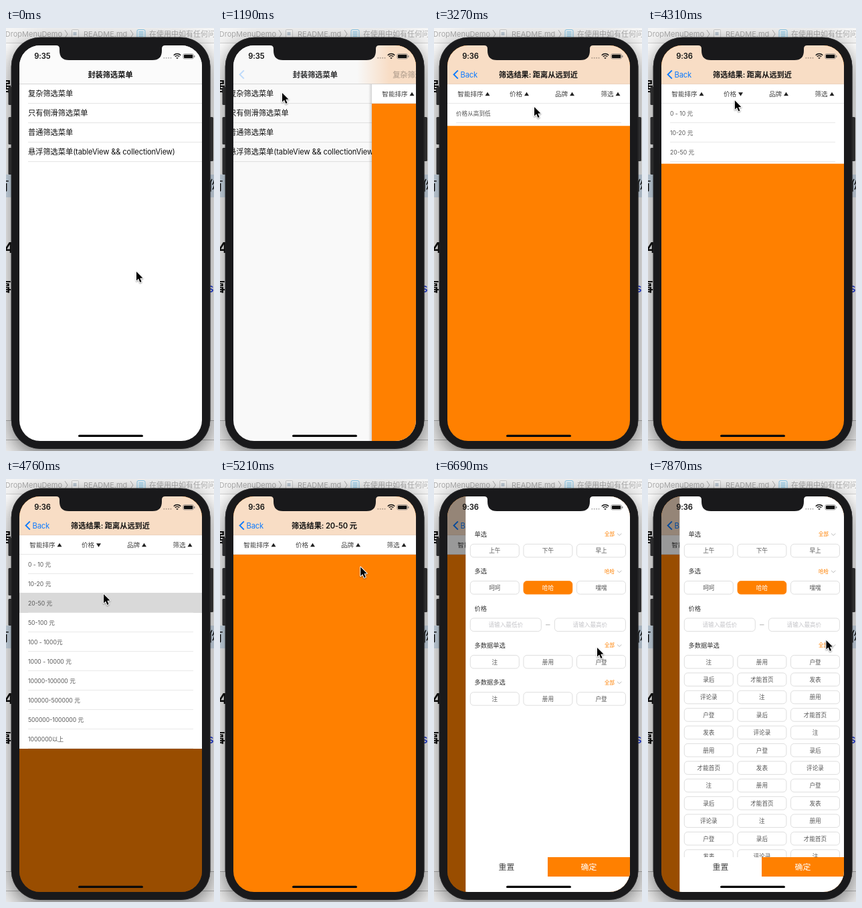
These frames come from a looping animation (311x632 px, 8000 ms). An HTML page with a canvas:

```html
<!DOCTYPE html>
<html lang="zh">
<head>
<meta charset="utf-8">
<title>Filter menu demo</title>
<style>
html, body { margin: 0; width: 100%; height: 100%; overflow: hidden; background: #fff; }
canvas { display: block; width: 311px; height: 632px; }
</style>
</head>
<body>
<canvas id="stage"></canvas>
<script>
const W = 311, H = 632, LOOP = 8000, TICK = 148.45;
const ORANGE = '#ff8000', TAN = '#f8ddc5', BLUE = '#0a7aff', GREY = '#555', EDGE = '#d0d0d0';
const FONT = 'Inter, "Noto Sans CJK SC", "Noto Sans CJK", sans-serif';
const SX = 20, SY = 26, SW = 273, SH = 591;   // phone screen
const ROW = 29, BAR = 84, LIST = 113;

const canvas = document.getElementById('stage');
const dpr = window.devicePixelRatio || 1;
canvas.width = W * dpr;
canvas.height = H * dpr;
const c = canvas.getContext('2d');

const HOME_ROWS = ['复杂筛选菜单', '只有侧滑筛选菜单', '普通筛选菜单', '悬浮筛选菜单(tableView && collectionView)'];
const TABS = [['智能排序', 35.3], ['价格', 113], ['品牌', 181], ['筛选', 249.5]];
const WORDS = ['注', '册用', '户登', '录后', '才能首页', '发表', '评论录'];
const MENUS = [
  { tab: 0, open: 2290, press: 2820, close: 3059, pick: 2,
    rows: ['价格从高到低', '价格从低到高', '距离从远到近', '销量从低到高', '信用从高到低'] },
  { tab: 1, open: 4194, press: 4740, close: 4860, pick: 2,
    rows: ['0 - 10 元', '10-20 元', '20-50 元', '50-100 元', '100 - 1000元', '1000 - 10000 元',
      '10000-100000 元', '100000-500000 元', '500000-1000000 元', '1000000以上'] }
];
// time, x, y of the pointer tip
const POINTER = [
  [150, 195, 364], [890, 93, 97], [1640, 93, 97], [1900, 72, 97], [2220, 72, 97],
  [2520, 94, 177], [2900, 94, 177], [3265, 150, 118], [3700, 130, 97], [4160, 127, 97],
  [4750, 146, 172], [4880, 146, 172], [5480, 265, 97], [5620, 264, 98], [5938, 252, 127],
  [6330, 172, 158], [6400, 172, 158], [6680, 244, 252], [7250, 266.5, 241]
];

const clamp = v => Math.max(0, Math.min(1, v));
const ease = v => { v = clamp(v); return v * v * (3 - 2 * v); };
const mix = (a, b, k) => a + (b - a) * k;

function rect(x, y, w, h, fill) {
  c.fillStyle = fill;
  c.fillRect(x, y, w, h);
}

function round(x, y, w, h, r, fill, stroke) {
  c.beginPath();
  c.roundRect(x, y, w, h, r);
  if (fill) { c.fillStyle = fill; c.fill(); }
  if (stroke) { c.strokeStyle = stroke; c.lineWidth = 0.7; c.stroke(); }
}

function poly(points, fill) {
  c.beginPath();
  points.forEach(([x, y]) => c.lineTo(x, y));
  c.closePath();
  c.fillStyle = fill;
  c.fill();
}

function line(points, color, width) {
  c.beginPath();
  points.forEach(([x, y]) => c.lineTo(x, y));
  c.strokeStyle = color;
  c.lineWidth = width;
  c.stroke();
}

// y is the visual middle; Latin runs of large text are tracked tighter
function text(s, x, y, size, color, align = 'left', weight = 400) {
  c.font = `${weight} ${size}px ${FONT}`;
  c.fillStyle = color;
  c.textAlign = 'left';
  const runs = s.match(/[\x00-\x7f]+|[^\x00-\x7f]+/g).map(run => {
    const gap = size > 11.1 && run.charCodeAt(0) < 128 ? -0.0125 * size : 0;
    c.letterSpacing = gap + 'px';
    return { run, gap, width: c.measureText(run).width };
  });
  const total = runs.reduce((sum, r) => sum + r.width, 0);
  x -= align === 'center' ? total / 2 : align === 'right' ? total : 0;
  for (const r of runs) {
    c.letterSpacing = r.gap + 'px';
    c.fillText(r.run, x, y + 0.37 * size);
    x += r.width;
  }
  c.letterSpacing = '0px';
}

function faded(alpha, draw) {
  c.save();
  c.globalAlpha *= clamp(alpha);
  draw();
  c.restore();
}

function clipped(x, y, w, h, draw) {
  c.save();
  c.beginPath();
  c.rect(x, y, w, h);
  c.clip();
  draw();
  c.restore();
}

function desktop() {
  rect(0, 0, W, H, '#f6f6f6');
  rect(0, 23, W, H, '#fff');
  rect(0, 22, W, 0.8, '#cfcfcf');
  const ink = '#adadad';
  text('DropMenuDemo', 84, 9, 11, ink, 'right');
  text('README.md', 116, 9, 11, ink);
  text('在使用中如有任何问题', 214, 9, 11, ink);
  for (const x of [88, 186]) line([[x, 3], [x + 4, 9], [x, 15]], ink, 1);
  round(98.5, 2.5, 10, 13, 1, '#fafafa', '#bbb');
  rect(100.5, 6, 5, 5, '#c3cfda');
  round(196, 2.5, 12, 13, 2, '#eef8fd', '#62b9e6');
  for (let i = 0; i < 3; i++) rect(198.5, 5.5 + i * 3, 7, 1, '#62b9e6');
  rect(0, 219, W, 34, '#d9e8f6');
  text('居', -12, 88, 20, '#111', 'left', 700);
  text('有', -15, 236, 20, '#111', 'left', 500);
  text('4', -3, 328, 22, '#111', 'left', 700);
  text('事', -13, 387, 21, '#111', 'left', 700);
  text('你', 302, 236, 20, '#111', 'left', 500);
  text('s', 301, 388, 18, '#2440e8', 'left', 500);
  rect(0, 586, W, 46, '#f1f1f1');
  rect(0, 586, W, 1, '#b5b5b5');
  rect(0, 615, W, 1, '#b5b5b5');
}

function body() {
  for (const [y, h] of [[88, 27], [133, 41], [179, 40]]) round(3.5, y, 6, h, 1.5, '#3b3b3d');
  round(303, 133, 7, 66, 1.5, '#3b3b3d');
  c.save();
  c.shadowColor = 'rgba(0,0,0,.55)';
  c.shadowBlur = 32 * dpr;
  c.shadowOffsetY = 9 * dpr;
  round(7.7, 13.7, 297.8, 615.3, 44, '#19191b');
  c.restore();
  round(8.2, 14.2, 296.8, 614.3, 43.5, null, '#2e2e30');
}

function homePage(dx) {
  rect(SX, SY, SW, SH, '#fff');
  HOME_ROWS.forEach((s, i) => {
    const y = BAR + ROW * i;
    text(s, 33 + dx, y + 14.3, 11.2, '#111');
    rect(33 + dx, y + 28.3, 260 - dx, 0.8, '#dcdcdc');
  });
}

function menuState(m, t) {
  const dur = 300;
  const size = t < m.close ? ease((t - m.open) / dur) : 1 - ease((t - m.close) / dur);
  return { size, active: t >= m.open - 80 && t < m.close, dim: t >= m.open + dur && t < m.close };
}

function filterPage(t, dx) {
  c.save();
  c.translate(dx, 0);
  rect(SX, SY, SW, SH, ORANGE);
  let openTab = -1;
  for (const m of MENUS) {
    const s = menuState(m, t);
    if (s.active) openTab = m.tab;
    if (s.dim) rect(SX, LIST, SW, SH, 'rgba(0,0,0,.4)');
    if (s.size <= 0) continue;
    clipped(SX, LIST, SW, m.rows.length * ROW * s.size, () => {
      rect(SX, LIST, SW, SH, '#fff');
      m.rows.forEach((label, i) => {
        const y = LIST + ROW * i;
        if (i === m.pick && t >= m.press && t < m.close) rect(SX, y - 1, SW, ROW + 1, '#d9d9d9');
        text(label, 33, y + 14.5, 8.6, GREY);
        rect(33, y + 28.1, 247, 0.8, '#e4e4e4');
      });
    });
  }
  rect(SX, BAR, SW, ROW, '#fff');
  rect(SX, LIST - 0.8, SW, 0.8, '#e2e2e2');
  TABS.forEach(([label, x], i) => {
    text(label, x, 98.7, 9.6, '#444');
    const ax = x + label.length * 9.6 + 2.8, up = i !== openTab;
    const base = up ? 101.3 : 96.2, tip = up ? 95.8 : 101.7;
    poly([[ax, base], [ax + 7, base], [ax + 3.5, tip]], '#222');
  });
  c.restore();
}

function navBar(t, p) {
  if (p <= 0) rect(SX, SY, SW, BAR - SY, '#fbfbfb');
  else if (p >= 1) rect(SX, SY, SW, BAR - SY, TAN);
  else {
    const edge = SX + SW * (1 - p);
    const g = c.createLinearGradient(edge - 22, 0, edge + 26, 0);
    g.addColorStop(0, '#f8f8f8');
    g.addColorStop(1, TAN);
    rect(SX, SY, SW, BAR - SY, g);
  }
  rect(SX, BAR - 0.6, SW, 0.7, p >= 1 ? '#e5cdb8' : '#c6c6c6');

  const result = [...MENUS].reverse().find(m => t >= m.close);
  const title = result ? '筛选结果: ' + result.rows[result.pick] : '复杂筛选菜单';
  const x = 156 - 83 * Math.pow(p, 1.27);
  if (p < 1) faded(1 - Math.pow(p, 1.5), () => text('封装筛选菜单', x, 69.5, 11.2, '#111', 'center', 600));
  if (p <= 0) return;
  faded(p, () => {
    text(title, 156 + 179 * (1 - p), 69.5, 11.2, '#111', 'center', 600);
    line([[35.8, 63.3], [29.6, 69.5], [35.8, 75.7]], BLUE, 1.9);
  });
  if (result) text('Back', 39.5, 69.5, 11.2, BLUE);
  else faded(p * p * p, () => text('封装筛选菜单', x, 69.5, 11.2, BLUE, 'center'));
}

function chip(label, col, y, on) {
  const x = 54.3 + col * 79.6;
  round(x, y, 73, 19.6, 5, on ? ORANGE : '#fff', on ? ORANGE : EDGE);
  text(label, x + 36.5, y + 10, 8.6, on ? '#fff' : GREY, 'center');
}

function heading(label, y, value) {
  text(label, 60.5, y, 9.25, '#333', 'left', 500);
  if (!value) return;
  text(value, 270, y, 7.5, ORANGE, 'right', 500);
  line([[274, y - 1.2], [277.2, y + 1.8], [280.4, y - 1.2]], '#aaa', 0.8);
}

function wordRows(top, count, limit) {
  for (let i = 0; i < count * 3; i++) {
    const y = top + Math.floor(i / 3) * 26.4;
    if (y < limit) chip(WORDS[i % WORDS.length], i % 3, y);
  }
}

function drawer(t) {
  const start = 5722, dur = 330, shown = ease((t - start) / dur);
  if (shown <= 0) return;
  if (t >= start + dur) rect(SX, SY, SW, SH, 'rgba(0,0,0,.4)');
  const picked = t >= 6390;
  const shift = ease((t - 7250) / 450) * 13 * 26.4;
  c.save();
  c.translate(246 * (1 - shown), 0);
  rect(47.3, SY, 247, SH, '#fff');
  clipped(47, SY, 247, 565 - SY, () => {
    heading('单选', 82.6, '全部');
    ['上午', '下午', '早上'].forEach((s, i) => chip(s, i, 97.3));
    heading('多选', 138, picked ? '哈哈' : '全部');
    ['呵呵', '哈哈', '嘿嘿'].forEach((s, i) => chip(s, i, 152.5, picked && i === 1));
    heading('价格', 193.3);
    [['请输入最低价', 54.3], ['请输入最高价', 180.4]].forEach(([s, x]) => {
      round(x, 208, 106, 19.6, 5, '#fff', EDGE);
      text(s, x + 53, 218, 8.6, '#c4c4c8', 'center');
    });
    rect(167, 217.4, 6.5, 0.9, '#aaa');
    heading('多数据单选', 248.6, '全部');
    clipped(47, 258, 247, 35 + shift, () => wordRows(263.4, shift > 0 ? 14 : 1, 600));
    heading('多数据多选', 304 + shift, '全部');
    wordRows(318.6 + shift, 1, 600);
  });
  rect(170, 565, 124, 29, ORANGE);
  text('重置', 108.5, 579.5, 11.9, '#444', 'center');
  text('确定', 231.5, 579.5, 11.9, '#fff', 'center');
  c.restore();
}

function statusBar(t) {
  text(t < 1700 ? '9:35' : '9:36', 42.3, 42.3, 11.2, '#111', 'left', 600);
  for (let i = 0; i < 4; i++) round(235.3 + i * 3.4, 43.8, 2, 2, 1, 'rgba(0,0,0,.3)');
  c.lineWidth = 1.5;
  c.strokeStyle = '#111';
  for (const r of [7.4, 4.6]) {
    c.beginPath();
    c.arc(256, 46, r, -Math.PI * 0.75, -Math.PI * 0.25);
    c.stroke();
  }
  poly([[256, 46.3], [254.1, 44.2], [257.9, 44.2]], '#111');
  round(264.8, 38.6, 15.6, 7.4, 2, null, '#777');
  round(265.9, 39.7, 13.4, 5.2, 1.2, '#111');
  round(281.2, 41, 1.2, 2.8, 0.6, '#777');
}

function notch() {
  c.beginPath();
  c.moveTo(75, 25);
  c.lineTo(75, 26);
  c.quadraticCurveTo(80, 26, 80, 31);
  c.lineTo(80, 34);
  c.quadraticCurveTo(80, 48, 94, 48);
  c.lineTo(219, 48);
  c.quadraticCurveTo(233, 48, 233, 34);
  c.lineTo(233, 31);
  c.quadraticCurveTo(233, 26, 238, 26);
  c.lineTo(238, 25);
  c.fillStyle = '#19191b';
  c.fill();
}

function pointer(t) {
  let i = POINTER.findIndex(k => k[0] > t);
  if (i < 0) i = POINTER.length;
  const a = POINTER[Math.max(0, i - 1)], b = POINTER[Math.min(i, POINTER.length - 1)];
  const k = a === b ? 0 : ease((t - a[0]) / (b[0] - a[0]));
  c.save();
  c.translate(mix(a[1], b[1], k), mix(a[2], b[2], k));
  c.shadowColor = 'rgba(0,0,0,.4)';
  c.shadowBlur = 2 * dpr;
  c.shadowOffsetY = dpr;
  const shape = [[0, 0], [0, 13.4], [3.1, 10.5], [5.4, 16], [7.6, 15.1], [5.3, 9.8], [9.5, 9.6]];
  c.lineJoin = 'round';
  line([...shape, shape[0], shape[1]], '#fff', 2);
  c.shadowColor = 'transparent';
  poly(shape, '#000');
  c.restore();
}

function screen(t) {
  c.save();
  c.beginPath();
  c.roundRect(SX, SY, SW, SH, 31);
  c.clip();
  // critically damped push of the second page
  const w = Math.max(0, t - 1125) * 0.015;
  let p = 1 - (1 + w) * Math.exp(-w);
  if (p > 0.998) p = 1;
  if (p < 1) {
    homePage(-82 * p);
    rect(SX, SY, SW, SH, `rgba(0,0,0,${0.1 * p})`);
  }
  if (p > 0) {
    const dx = Math.round(SW * (1 - p));
    if (p < 1) {
      const g = c.createLinearGradient(SX + dx - 5, 0, SX + dx, 0);
      g.addColorStop(0, 'rgba(0,0,0,0)');
      g.addColorStop(1, 'rgba(0,0,0,.15)');
      rect(SX + dx - 5, BAR, 5, SH, g);
    }
    filterPage(t, dx);
  }
  navBar(t, p);
  drawer(t);
  statusBar(t);
  round(108, 607.7, 97, 3.4, 1.7, '#0a0a0a');
  notch();
  c.restore();
}

const begin = performance.now();

function frame() {
  const now = (performance.now() - begin) % LOOP;
  const t = Math.floor(now / TICK) * TICK;
  c.setTransform(dpr, 0, 0, dpr, 0, 0);
  desktop();
  body();
  screen(t);
  pointer(t);
  requestAnimationFrame(frame);
}
frame();
</script>
</body>
</html>
```
